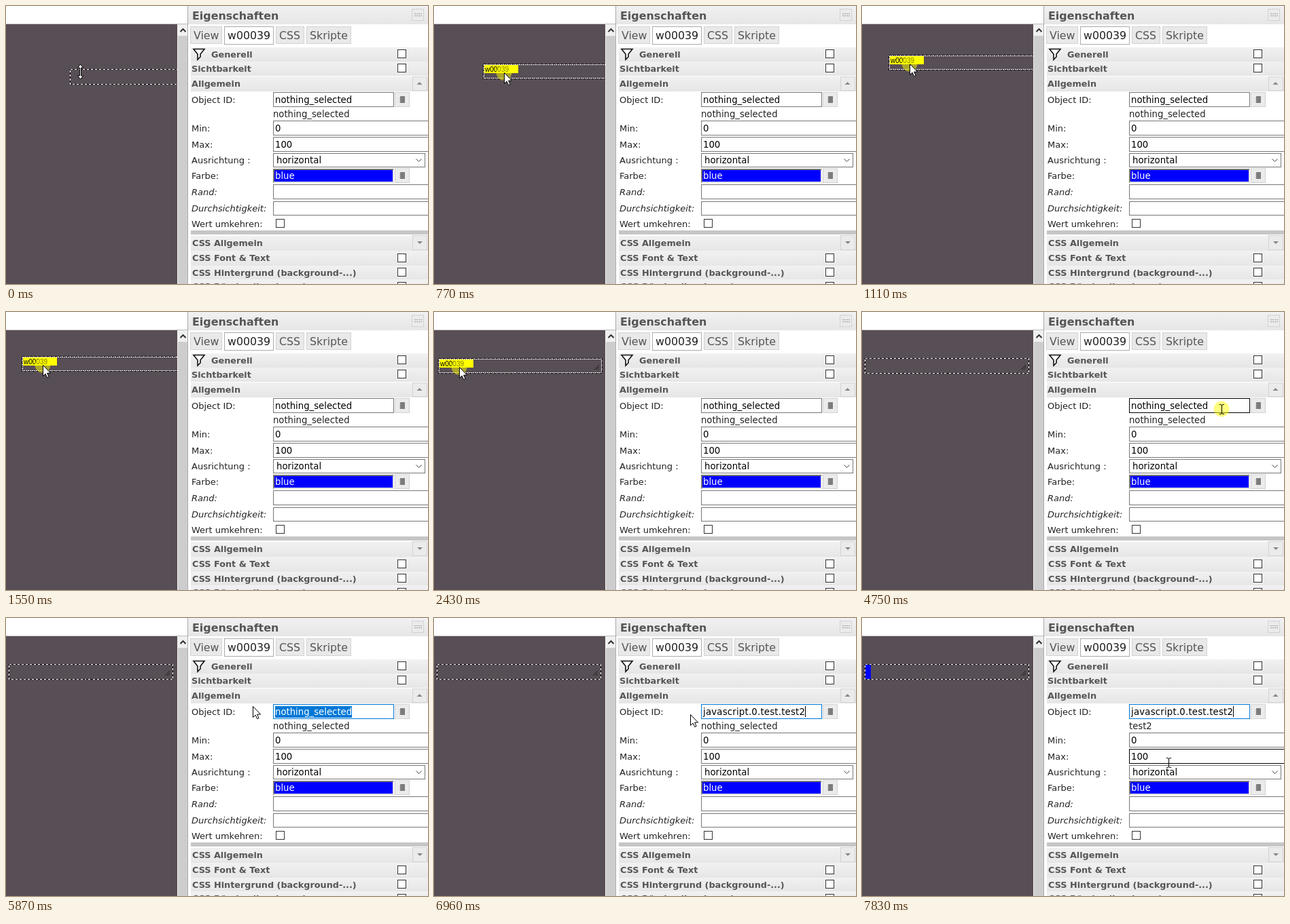
Recreate the animation shown at these times as an HTML page. Size 621 by 410 pixels, loop 8000 ms.

```html
<!DOCTYPE html>
<html lang="de">
<head>
<meta charset="utf-8">
<title>Eigenschaften</title>
<style>
html, body { margin: 0; width: 100%; height: 100%; overflow: hidden; background: #fff; }
svg { display: block; }
rect { shape-rendering: crispEdges; }
text { font: 13px "DejaVu Sans", sans-serif; fill: #222; white-space: pre; }
.bold { font-weight: bold; font-size: 12.8px; fill: #555; }
.head { font-weight: bold; font-size: 15.9px; fill: #555; }
.tab { font-size: 15.8px; fill: #555; }
.on { fill: #212121; }
.ital { font-style: italic; }
.val { font-size: 13.25px; fill: #000; }
.tag { font: 10px "Liberation Sans", Arial, sans-serif; fill: #000; }
</style>
</head>
<body>
<svg width="621" height="410" viewBox="0 0 621 410">
  <defs>
    <linearGradient id="bar" x2="0" y2="1">
      <stop stop-color="#f1f1f1"/><stop offset="1" stop-color="#e6e6e6"/>
    </linearGradient>
    <clipPath id="clip"><rect id="clipBox" y="130" height="17"/></clipPath>
  </defs>
  <rect y="27" width="252" height="383" fill="#584e55"/>
  <g id="widget">
    <rect id="fill" x="1" y="1" width="8" height="21" fill="#00f"/>
    <g id="idle" fill="none">
      <rect x=".5" y=".5" width="241" height="22" stroke="#000"/>
      <rect x=".5" y=".5" width="241" height="22" stroke="#fff" stroke-dasharray="3 3"/>
    </g>
    <g id="drag" fill="none">
      <rect x=".5" y=".5" width="241" height="22" stroke="#000" stroke-dasharray="3 3"/>
      <rect x="1.5" y="1.5" width="239" height="20" stroke="#fff" stroke-dasharray="2 1"/>
    </g>
    <path d="M230 17l7-7M233 17l4-4M236 17l1-1" stroke="#111" stroke-width=".8"/>
    <g id="tag">
      <rect x="2" y="2" width="50" height="12" fill="#ff0"/>
      <text x="3" y="12" class="tag">w00039</text>
    </g>
  </g>
  <g id="panel"></g>
  <text id="value" x="396" y="143" class="val"></text>
  <rect id="select" y="130" height="17" fill="#0078d7"/>
  <text x="396" y="143" class="val" style="fill:#fff" clip-path="url(#clip)">nothing_selected</text>
  <rect id="caret" x="546" y="130" width="1" height="16"/>
  <text id="name" x="393" y="164" style="font-size:13.2px"></text>
  <circle id="halo" r="11.5" fill="#ff0" fill-opacity=".5"/>
  <g id="cursor">
    <path id="resize" d="M.5-11l4 5h-3v12h3l-4 5-4-5h3v-12h-3z" fill="#fff" stroke="#000"/>
    <path id="arrow" d="M.5.5v16l3.6-3.4 2.6 5.6 2.4-1.1-2.5-5.5h5z" fill="#fff" stroke="#000"/>
    <path id="beam" d="M-3-6.5h2l1.5 1 1.5-1h2M.5-6v13M-3 7.5h2l1.5-1 1.5 1h2" fill="none" stroke="#000"/>
  </g>
</svg>
<script>
const $ = id => document.getElementById(id);
const LOOP = 8000;

// Panel building blocks
const text = (x, y, s, cls = '') => `<text x="${x}" y="${y}" class="${cls}">${s}</text>`;
const rect = (x, y, w, h, fill, stroke, extra = '') => stroke
  ? `<rect x="${x + .5}" y="${y + .5}" width="${w - 1}" height="${h - 1}" fill="${fill}" stroke="${stroke}" ${extra}/>`
  : `<rect x="${x}" y="${y}" width="${w}" height="${h}" fill="${fill}"/>`;
const path = (d, fill, stroke = 'none', width = 1) =>
  `<path d="${d}" fill="${fill}" stroke="${stroke}" stroke-width="${width}"/>`;
const check = (x, y) => rect(x, y, 13, 13, '#fff', '#333');
const button = (x, y, w, h) => rect(x, y, w, h, '#ebebeb', '#d3d3d3');
const bar = (y, h, s, x = 273) => rect(272, y, 349, h, 'url(#bar)') + text(x, y + 15, s, 'bold');
const tab = (x, w, s, tx, on) =>
  rect(x, 30, w, on ? 27 : 26, on ? '#fff' : '#e9e9e9', on ? '#aaa' : '#d3d3d3') +
  text(tx, 49, s, on ? 'tab on' : 'tab');
const pick = y => button(572, y, 22, 22) + rect(580, y + 6, 7, 10, '#7c7c7c') +
  path(`M579 ${y + 8.5}h2m-2 3h2m-2 3h2`, 'none', '#999');

// Text inputs: x, y, width, height
const fields = [
  [393, 127, 178, 22], [393, 169, 240, 22], [393, 193, 240, 22],
  [393, 263, 240, 22], [393, 288, 240, 21]
];

$('panel').innerHTML =
  rect(0, 0, 268, 26, '#fff') + rect(0, 26, 268, 1, '#bbb') +
  rect(252, 27, 16, 383, '#f0f0f0') + rect(253, 44, 14, 366, '#cdcdcd') +
  path('M256.5 38l4-4 4 4', 'none', '#333', 2) +
  rect(268, 0, 353, 410, '#fff') + rect(267, 0, 1, 410, '#aaa') +
  rect(268, 0, 353, 27, 'url(#bar)') + text(274, 20, 'Eigenschaften', 'head') +
  button(597, 4, 18, 18) +
  [0, 1, 2, 3].map(i => rect(601 + 3 * i, 11, 2, 1, '#999') + rect(601 + 3 * i, 14, 2, 1, '#999')).join('') +
  tab(271, 47, 'View', 276) + tab(321, 73, 'w00039', 326, true) +
  tab(397, 42, 'CSS', 402) + tab(442, 66, 'Skripte', 447) +
  bar(61, 21, 'Generell', 302) + bar(82, 21, 'Sichtbarkeit') + bar(104, 22, 'Allgemein') +
  path('M276 63.5h16l-6 7.5v4l-4 4v-8z', '#fff', '#111', 1.6) +
  check(576, 64) + check(576, 85) +
  button(598, 104, 22, 21) + path('M604.5 116h8l-4-4z', '#888') +
  text(273, 143, 'Object ID:') + text(273, 185, 'Min:') + text(273, 209, 'Max:') +
  text(273, 232, 'Ausrichtung :') + text(273, 255, 'Farbe:') +
  text(273, 279, 'Rand:', 'ital') + text(273, 303, 'Durchsichtigkeit:', 'ital') +
  text(273, 326, 'Wert umkehren:') + check(397, 314) +
  fields.map((f, i) => rect(...f, '#fff', '#777', `id="field${i}"`)).join('') +
  text(396, 185, '0', 'val') + text(396, 209, '100', 'val') +
  rect(393, 217, 224, 21, '#fff', '#777') + text(398, 232, 'horizontal', 'val') +
  path('M603.5 225.5l4 4 4-4', 'none', '#444') +
  rect(393, 240, 178, 21, '#e3e3e3') + path('M393 261v-21h178l-2 2h-174v17z', '#767676') +
  rect(395, 242, 174, 17, '#00f') +
  '<text x="396" y="255" class="val" style="fill:#fff">blue</text>' +
  pick(127) + pick(239) +
  rect(272, 331, 349, 6, '#c6c6c6') +
  bar(339, 22, 'CSS Allgemein', 274) + button(598, 338, 22, 22) + path('M605 347h8l-4 4z', '#888') +
  bar(361, 22, 'CSS Font &amp; Text', 274) + check(576, 365) +
  bar(383, 20, 'CSS Hintergrund (background-...)', 274) + check(576, 386) +
  bar(403, 22, 'CSS Ränder (border-...)', 274) + check(576, 407);

// Pointer moves: first step, last step, step count, end x, end y
const moves = [
  [120, 220, 2, 124, 110], [450, 450, 1, 125, 106],
  [650, 1110, 5, 70, 85], [1220, 1550, 4, 54, 78],
  [1660, 1890, 3, 44, 79], [2110, 2430, 4, 37, 81], [2550, 2550, 1, 35, 81],
  [3530, 4310, 8, 523, 147], [4430, 4530, 2, 529, 143],
  [4863, 4976, 2, 480, 148], [5090, 5430, 4, 363, 131], [5870, 5870, 1, 363, 130],
  [6960, 7060, 2, 390, 154], [7550, 7830, 4, 451, 213]
];

function pointer(t) {
  let x = 109, y = 97;
  for (const [start, end, steps, ex, ey] of moves) {
    if (t < start) break;
    const done = steps < 2 ? 1 : Math.min(steps, 1 + Math.floor((t - start) / (end - start) * (steps - 1) + 1e-6));
    x += (ex - x) * done / steps;
    y += (ey - y) * done / steps;
  }
  return [Math.round(x), Math.round(y)];
}

const show = (id, on) => $(id).setAttribute('visibility', on ? 'visible' : 'hidden');
const move = (id, x, y) => $(id).setAttribute('transform', `translate(${x} ${y})`);
const within = (t, a, b) => t >= a && t < b;

function draw(t) {
  const [x, y] = pointer(t);

  // The widget follows the pointer while it is dragged
  const [gx, gy] = pointer(Math.max(649, Math.min(t, 2880)));
  const bx = gx - 31, by = gy - 13;
  const dragging = within(t, 650, 2880);
  move('widget', bx, by);
  show('drag', dragging);
  show('idle', !dragging);
  show('tag', t >= 650 && x < bx + 242 && y < by + 23);
  show('fill', t >= 7060);

  // Field hover and focus
  const focused = t >= 4863;
  const selecting = within(t, 4750, 5870);
  let inField = false;
  fields.forEach(([fx, fy, w, h], i) => {
    const over = x >= fx && x < fx + w && y >= fy && y < fy + h;
    inField = inField || over;
    $('field' + i).setAttribute('stroke', !i && focused ? '#0078d7' : over ? '#000' : '#777');
  });

  // Selection grows leftwards by whole letters
  const pasted = t >= 6200, letter = 113 / 16;
  const letters = focused && !pasted ? Math.max(0, Math.min(16, Math.round((509 - x) / letter))) : 0;
  for (const id of ['select', 'clipBox']) {
    $(id).setAttribute('x', 509 - letters * letter);
    $(id).setAttribute('width', letters * letter);
  }
  $('value').textContent = pasted ? 'javascript.0.test.test2' : 'nothing_selected';
  $('value').style.letterSpacing = pasted ? '.22px' : '0';
  $('name').textContent = t < 7060 ? 'nothing_selected' : 'test2';
  show('caret', pasted && !within(t, 6410, 6960));

  const beam = inField || selecting, resize = t < 120;
  move('cursor', x, y);
  show('resize', resize);
  show('beam', beam);
  show('arrow', !beam && !resize);
  move('halo', x, y);
  show('halo', within(t, 650, 3310) || within(t, 4750, 5650));
}

function frame() {
  draw(performance.now() % LOOP);
  requestAnimationFrame(frame);
}
frame();
</script>
</body>
</html>
```
